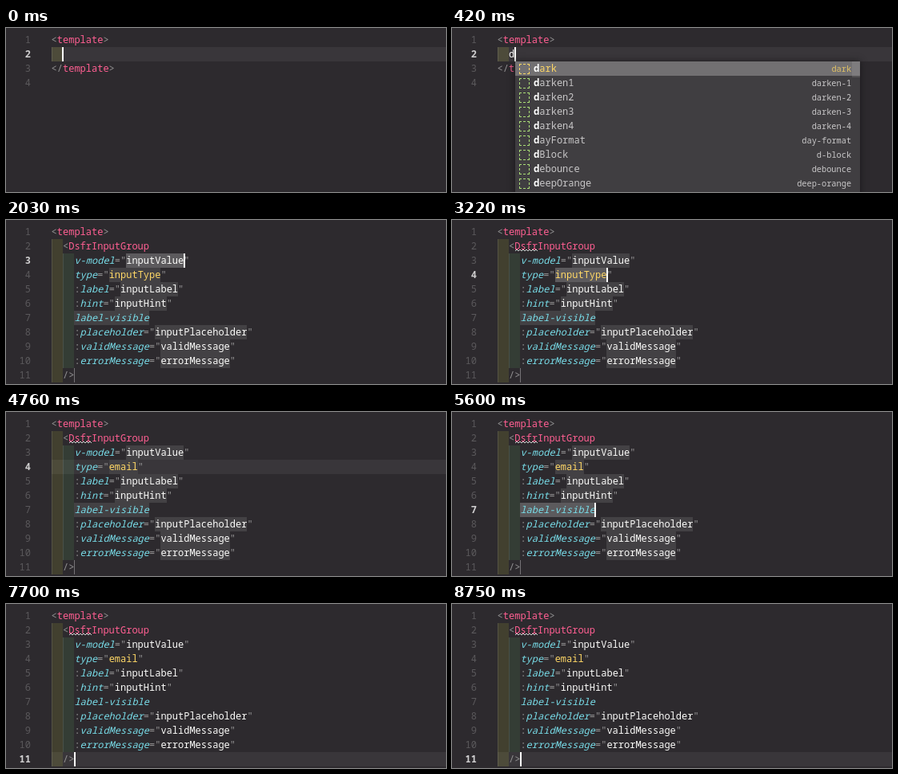
Animation of 550x206 px, one loop 9240 ms. Source, as an HTML page:

```html
<!DOCTYPE html>
<html lang="en">
<head>
<meta charset="utf-8">
<title>Snippet completion</title>
<style>
html, body { margin: 0; width: 100%; height: 100%; overflow: hidden; background: #2d2a2e; }
#stage {
  position: relative; width: 550px; height: 206px; overflow: hidden;
  background: #2d2a2e; color: #939293; white-space: pre;
  font: 500 12px/18px "Noto Sans Mono", "DejaVu Sans Mono", monospace;
  font-variant-ligatures: none;
}
#stage div, #caret { position: absolute; }
.line { left: 56.6px; height: 18px; }
.num { left: 0; width: 31px; height: 18px; text-align: right; color: #5b595c; }
.num.now { color: #d0cfd0; font-weight: 700; }
.band { left: 57px; right: 0; height: 18px; background: #39363a; }
.line span { display: inline-block; height: 18px; vertical-align: top; }
.in1, .in2 { box-shadow: inset 1px 0 rgba(255, 255, 255, .1); }
.in1 { background: rgba(255, 255, 64, .1); }
.in2 { background: rgba(127, 255, 127, .09); }
.tag { color: #ff5f92; }
.attr { color: #78dce8; font-style: italic; }
.val { color: #fcfcfa; }
.str { color: #ffd866; }
.stop, .same { background: #434144; }
.sel { background: #5c5a5d; }
.wave { left: 79px; top: 36px; }
.end { left: 85px; top: 186px; width: 1px; height: 18px; background: #757376; }
#caret { width: 2px; height: 18px; background: #fcfcfa; }
.popup { top: 42px; width: 431px; height: 180px; background: #403e41; color: #c8c7c8; box-shadow: 0 0 8px #19181a; }
.item { left: 0; width: 431px; height: 18px; }
.item.pick { background: #727072; color: #ffd866; }
.item b { color: #fff; }
.icon { left: 5px; top: 3px; width: 11px; height: 11px; border: 1px dashed #a9dc76; }
.pick .icon { border-color: #ffd866; }
.label { left: 23px; }
.note { right: 11px; font-size: 10.3px; }
.pick .note { color: #dfc065; }
.thumb { right: 0; top: 0; width: 10px; background: rgba(193, 192, 192, .15); }
</style>
</head>
<body>
<div id="stage"></div>
<script>
(() => {
const stage = document.getElementById('stage');
const LOOP = 9240, CHAR = 7.2, LEFT = 56.5;

const attrs = [
  ['v-model', 'inputValue'], ['type', 'inputType'], [':label', 'inputLabel'],
  [':hint', 'inputHint'], ['label-visible', ''], [':placeholder', 'inputPlaceholder'],
  [':validMessage', 'validMessage'], [':errorMessage', 'errorMessage']
];
const LAST = attrs.length;

const dsfr = names => names.split(' ').map(n => 'Dsfr' + n);
const lists = {
  d: 'dark darken1 darken2 darken3 darken4 dayFormat dBlock debounce deepOrange'.split(' '),
  ds: dsfr('Accordion AccordionsGroup Alert Badge Breadcrumb Button ButtonGroup Callout Card'),
  dsg: dsfr('InputGroup ButtonGroup Highlight Logo Pagination Tag Tags ToggleSwitch Badge')
};
const thumbs = { d: 20, ds: 40, dsg: 83 };

// Each step changes part of the editor state at its time in ms.
const steps = [
  [0, { typed: '', stop: -1, word: '', on: true, wave: false }],
  [210, { on: false }],
  [420, { typed: 'd', on: true }],
  [560, { typed: 'ds' }],
  [1120, { typed: 'dsg' }],
  [1680, { on: false }],
  [1960, { stop: 0, on: true }],
  [2100, { wave: true }],
  [2520, { on: false }],
  [3010, { on: true }],
  [3220, { stop: 1 }],
  [3640, { word: 'e' }],
  [3710, { word: 'em' }],
  [3850, { word: 'ema' }],
  [3990, { word: 'emai' }],
  [4200, { word: 'email' }],
  [4690, { on: false }],
  [5110, { stop: 2, on: true }],
  [5390, { stop: 3 }],
  [5600, { stop: 4 }],
  [5810, { stop: 5 }],
  [6020, { stop: 6 }],
  [6510, { stop: 7 }],
  [7000, { on: false }],
  [7560, { on: true }],
  [7700, { stop: LAST }],
  [8260, { on: false }],
  [8750, { on: true }]
];

const span = (cls, text) => `<span class="${cls}">${text}</span>`;
const div = (cls, style, text = '') => `<div class="${cls}" style="${style}">${text}</div>`;
const rowTop = row => 6 + 18 * (row - 1);
const line = (row, html) => div('line', `top:${rowTop(row)}px`, html);
const number = (row, now) => div('num' + (row === now ? ' now' : ''), `top:${rowTop(row)}px`, row);
const band = row => div('band', `top:${rowTop(row)}px`);
const caret = (row, col) =>
  `<i id="caret" style="left:${Math.floor(LEFT + col * CHAR)}px;top:${rowTop(row)}px"></i>`;
const numbers = (count, now) =>
  Array.from({ length: count }, (_, i) => number(i + 1, now)).join('');

const in1 = span('in1', '  ');
const indent = in1 + span('in2', '  ');
const opening = line(1, '&lt;' + span('tag', 'template') + '&gt;');
const wavePath = 'M0 3' + Array.from({ length: 14 }, (_, i) => `l2 ${i % 2 ? 2 : -2}`).join('');
const wave = div('wave', '', `<svg width="30" height="5" style="display:block"><path d="${wavePath}" fill="none" stroke="#d6d5d6"/></svg>`);

// Emphasises the letters that match the query, in order.
function emphasise(name, query) {
  let k = 0;
  return [...name].map(c => {
    const hit = k < query.length && c.toLowerCase() === query[k];
    if (hit) k++;
    return hit ? `<b>${c}</b>` : c;
  }).join('');
}

const kebab = name => /^Dsfr/.test(name) ? name
  : name.replace(/[A-Z]|\d/g, c => '-' + c.toLowerCase());

function popup(query) {
  const items = lists[query].map((name, i) =>
    div('item' + (i ? '' : ' pick'), `top:${18 * i}px`,
      div('icon', '') + div('label', '', emphasise(name, query)) + div('note', '', kebab(name))));
  const x = LEFT + (2 + query.length) * CHAR + 1;
  return div('popup', `left:${x}px`, items.join('') + div('thumb', `height:${thumbs[query]}px`));
}

function typing(s) {
  return band(2) + numbers(4, 2) + opening +
    line(2, in1 + span('val', s.typed)) +
    line(3, '&lt;/' + span('tag', 'template') + '&gt;') +
    (s.on ? caret(2, 2 + s.typed.length) : '') +
    (s.typed ? popup(s.typed) : '');
}

function attrLine(i, s) {
  const [attr, preset] = attrs[i];
  const value = i === 1 && s.word ? s.word : preset;
  const active = s.stop === i;
  const selected = active && !(i === 1 && s.word);
  const mark = s.stop === LAST ? '' : selected ? ' sel' : ' stop';
  const colon = attr[0] === ':' ? ':' : '';
  const name = attr.slice(colon.length);
  let html = indent + colon;
  if (value) {
    html += span('attr' + (active && name === value ? ' same' : ''), name) +
      '="' + span((i === 1 ? 'str' : 'val') + mark, value) + '"';
  } else {
    html += span('attr' + mark, name);
  }
  const col = 4 + attr.length + (value ? 2 + value.length : 0);
  return line(i + 3, html) + (active && s.on ? caret(i + 3, col) : '');
}

function snippet(s) {
  const row = s.stop + 3, done = s.stop === LAST;
  const plain = done || (s.stop === 1 && s.word);
  return (plain ? band(row) : '') + numbers(11, row) + opening +
    line(2, in1 + '&lt;' + span('tag', 'DsfrInputGroup')) +
    (s.wave ? wave : '') +
    attrs.map((_, i) => attrLine(i, s)).join('') +
    line(11, in1 + '/&gt;') +
    (done ? (s.on ? caret(11, 4) : '') : div('end', ''));
}

let shown = -1;
const start = performance.now();

function draw(now) {
  const t = Math.max(0, now - start) % LOOP;
  const count = steps.filter(([at]) => at <= t).length;
  if (count !== shown) {
    shown = count;
    const s = Object.assign({}, ...steps.slice(0, count).map(step => step[1]));
    stage.innerHTML = s.stop < 0 ? typing(s) : snippet(s);
  }
  requestAnimationFrame(draw);
}
draw(start);
})();
</script>
</body>
</html>
```
